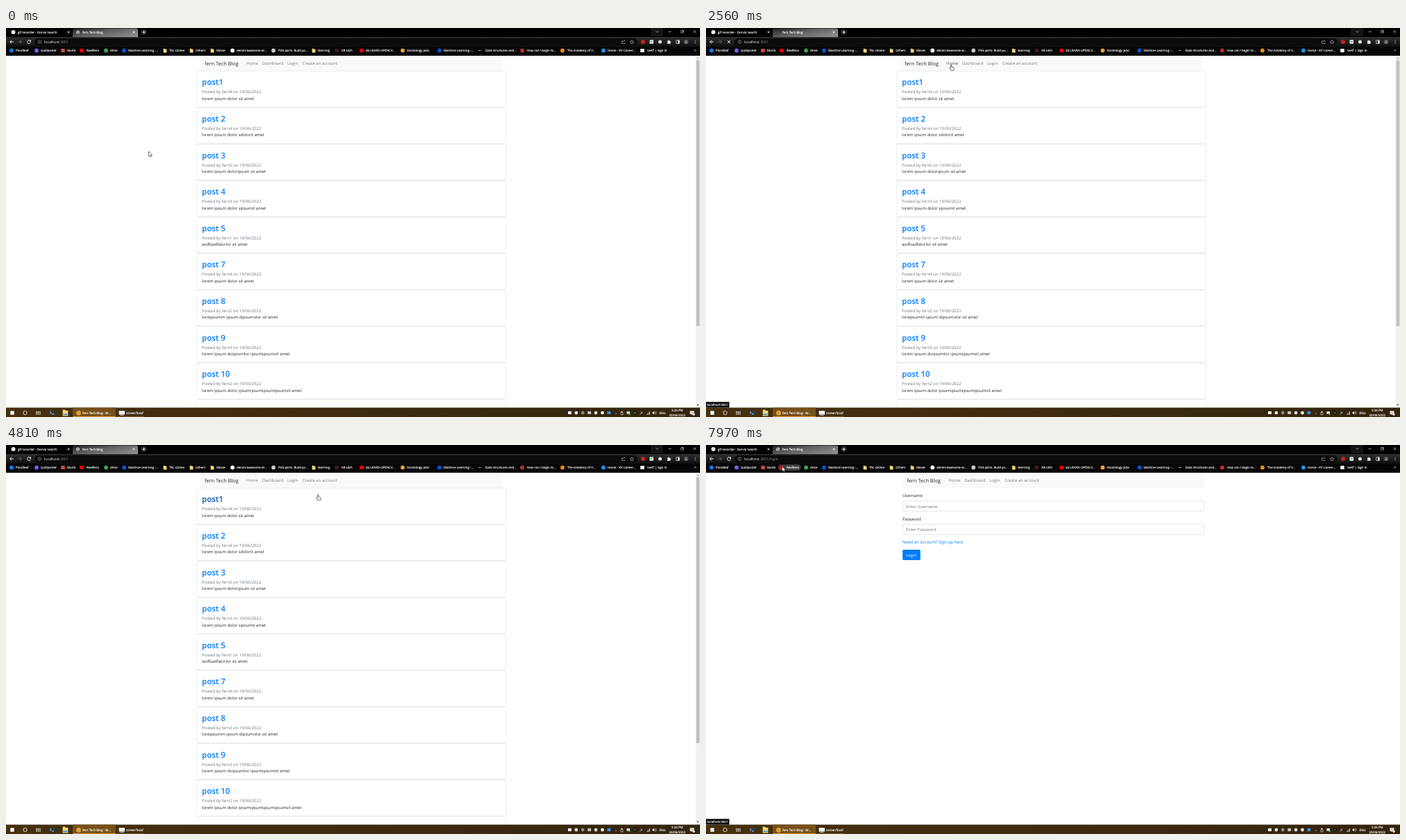
Recreate the animation shown at these times as an HTML page. Size 999 by 561 pixels, loop 8 s.

```html
<!DOCTYPE html>
<html lang="en">
<head>
<meta charset="utf-8">
<title>Blog walkthrough</title>
<style>
html, body { margin: 0; width: 100%; height: 100%; overflow: hidden; background: #fff; }
svg { display: block; width: 999px; height: 561px; font-family: "Open Sans", "Noto Sans", sans-serif; text-rendering: geometricPrecision; }
text { white-space: pre; }
.label { font-size: 4.45px; fill: #fff; stroke: #fff; stroke-width: .13px; }
</style>
</head>
<body>
<svg id="stage" viewBox="0 0 999 561" xmlns="http://www.w3.org/2000/svg"></svg>
<script>
const LOOP = 8000, MAX_SCROLL = 147, PITCH = 52.6, BODY = 5.95;
const stage = document.getElementById('stage');
const $ = id => document.getElementById(id);

// ---- drawing helpers
const text = (x, y, s, size, fill, more = '') =>
  `<text x="${x}" y="${y}" font-size="${size}" fill="${fill}" ${more}>${s}</text>`;
const label = (x, y, s, more = '') => `<text class="label" x="${x}" y="${y}" ${more}>${s}</text>`;
const rect = (x, y, w, h, fill, more = '') =>
  `<rect x="${x}" y="${y}" width="${w}" height="${h}" fill="${fill}" ${more}/>`;
const dot = (x, y, r, fill, more = '') => `<circle cx="${x}" cy="${y}" r="${r}" fill="${fill}" ${more}/>`;
const line = (d, color, w = 0.7) => `<path d="${d}" fill="none" stroke="${color}" stroke-width="${w}"/>`;
const group = (id, s) => `<g id="${id}">${s}</g>`;
const cross = (x, y, r, color, w) => line(`M${x - r} ${y - r}l${2 * r} ${2 * r}m0 ${-2 * r}l${-2 * r} ${2 * r}`, color, w);
const folder = (x, y, s = 1) =>
  `<path transform="translate(${x} ${y}) scale(${s})" d="M-2.4 -2.8h2l.6 .7h2.2v4.9h-4.8z" fill="#f7d774"/>`;

// ---- browser frame
const marks = [
  [8, 14, 'Pondleaf', '#1877f2'], [44, 50, 'Quillposter', '#7d5cf5'], [82, 88, 'Murlo', '#d9483b', 'sq'],
  [109, 116, 'Reelfenn', '#f00', 'sq'], [144, 150, 'drive', '#3fa45b'], [170, 176, 'Machine Learning -...', '#0056d2'],
  [229, 235, 'TAL Online', '', 'dir'], [267, 273, 'Others', '', 'dir'], [297, 303, 'Movie', '', 'dir'],
  [326, 332, 'dervin/awesome-al...', '#fff'], [385, 392, 'Pick parts. Build yo...', '#c9c9c9'],
  [443, 449, 'learning', '', 'dir'], [476, 483, 'Kệ sách', '#3b1d1a', 'sq'],
  [512, 518, '(8) LEARN OPENCV...', '#f00', 'sq'], [571, 577, 'Vocatology Jobs', '#e8a33d'],
  [624, 630, 'Machine Learning -...', '#0056d2'], [682, 690, 'Data Structures and...', '#aaa', 'dash'],
  [743, 750, 'How can I begin to...', '#c22d27'], [801, 808, 'The Academy of V...', '#f08a24'],
  [860, 866, 'Home - KV Career...', '#1f8fff'], [916, 923, 'SeAT | Sign In', '#f4f4f4', 'sq']
];
const markIcon = ([x, , , color, kind]) =>
  kind === 'dir' ? folder(x, 32.6) :
  kind === 'sq' ? rect(x - 2.8, 30, 5.6, 5, color) :
  kind === 'dash' ? rect(x - 2.2, 32, 4.4, 0.9, color) : dot(x, 32.5, 2.9, color);

const gray = '#c8c8c8';
const tabs =
  rect(0, 0, 999, 13, '#000') + rect(928, 0, 18, 12, '#141414') +
  `<path d="M96 13V3q0-2.500 2.500-2.500h89q2.500 0 2.500 2.500v10z" fill="url(#tab)"/>` +
  dot(10.5, 6, 3, '#efe4df') + label(17, 7.8, 'gif recorder - Dorvio Search') + cross(90, 6, 1.5, '#eee', 0.8) +
  group('favicon', dot(103.5, 6, 2.6, '#b5b5b5') + line('M101.800 4.600q1.600 .2 1.700 1.600t1.600 1.800', '#666', 0.7)) +
  label(110, 7.8, 'fern Tech Blog') + cross(184, 6, 1.5, '#fff', 0.8) +
  dot(198.5, 6, 4.6, '#222') + line('M196.200 6h4.600m-2.300-2.300v4.600', '#fff', 0.9) +
  line('M935.500 4.300l2 2 2-2', '#ccc', 0.7) + line('M953.500 5.500h4', '#eee', 0.6) +
  line('M971.500 4.300h3v3h-3zM972.500 4.300v-1h3v3h-1', '#eee', 0.5) + cross(991.5, 5.3, 1.8, '#fff', 0.6);

const toolbar =
  rect(0, 13, 999, 14, 'url(#bar)') + rect(41, 14.7, 868, 10.8, '#0b0b0b', 'rx="5.400"') +
  line('M11 20H5.700m2.400-2.400L5.700 20l2.400 2.400', '#fff', 0.9) +
  line('M17.300 20h5.200m-2.400-2.400l2.400 2.400-2.400 2.400', '#777', 0.8) +
  group('reload', line('M35.100 18.500a2.500 2.500 0 1 0 .5 2', '#fff', 0.9) + '<path d="M35.900 17v2.500h-2.500z" fill="#fff"/>') +
  group('stop', cross(33, 20, 2, '#fff', 0.9)) +
  dot(48.5, 20, 2.3, 'none', 'stroke="#bbb" stroke-width=".5"') + line('M48.500 19.700v1.500m0-2.500v.6', '#bbb', 0.6) +
  `<text x="55" y="21.900" font-size="5.190" fill="#fff">localhost<tspan id="url" fill="#8d8d8d"></tspan></text>` +
  line('M888 18.500h-1.500v4h4.500v-1.500m-3-.5q.3-2.200 2.800-2.200m-1-1.200l1.200 1.200-1.200 1.200', gray, 0.5) +
  line('M901 17.300l.8 1.900 2 .2-1.500 1.300.5 2-1.800-1.100-1.800 1.100.5-2-1.500-1.300 2-.2z', gray, 0.55) +
  dot(917, 20, 3.1, '#c9201f') + rect(926.5, 17.2, 5.5, 5.5, '#e8e8e8', 'rx=".6"') + rect(927.5, 19.4, 3.5, 0.8, '#555') +
  dot(941.5, 20, 2.5, '#eadfdd') +
  `<path d="M951.800 18.400h1.500a.8 .8 0 1 1 1.600 0h1.500v1.300a.8 .8 0 1 1 0 1.600v1.500h-4.600v-1.400a.8 .8 0 1 0 0-1.600z" fill="#eee"/>` +
  line('M964.700 17.800h4.600v4.600h-4.600z', '#eee', 0.7) + rect(967.3, 17.8, 2, 4.6, '#eee') +
  dot(979, 20, 3.3, '#4d5054') + dot(979, 19, 1.1, '#8c9094') + rect(977.3, 20.6, 3.4, 1.3, '#8c9094', 'rx=".6"') +
  [-2, 0, 2].map(d => dot(992, 20 + d, 0.55, '#eee')).join('');

const bookmarks =
  rect(0, 27, 999, 13, '#060606') + rect(0, 28, 0, 9, '#3d3d3d', 'id="pill" rx="4.500"') +
  marks.map(m => markIcon(m) + label(m[1], 34.2, m[2], 'data-mark=""')).join('') +
  line('M990.300 31l1.200 1.300-1.200 1.300m1.700-2.600l1.200 1.300-1.200 1.300', '#fff', 0.5);

// ---- page content
const posts = [
  ['1', 4, 'lorem ipsum dolor sit amet'], [' 2', 4, 'lorem ipsum dolor sdolorit amet'],
  [' 3', 5, 'lorem ipsum doloripsum sit amet'], [' 4', 3, 'lorem ipsum dolor sipsumit amet'],
  [' 5', 1, 'asdfsadfalorlor sit amet'], [' 7', 4, 'lorem ipsum dolor sit amet'],
  [' 8', 2, 'loreipsumm ipsum dipsumolor sit amet'], [' 9', 3, 'lorem ipsum doipsumlor ipsumipsumsit amet'],
  [' 10', 2, 'lorem ipsum dolor ipsumipsumipsumipsumsit amet'], [' 11', 1, 'lorem ipsum dolor sit amet'],
  [' 12', 5, 'lorem ipsum dolor sit amet'], [' 13', 3, 'lorem ipsum dolor sit amet']
];
const card = ([n, user, body], i) => {
  const y = 62 + i * PITCH;
  return rect(274.7, y + 0.2, 444.8, PITCH - 0.4, '#fff', 'stroke="#dcdcdc" stroke-width=".5" rx="1.600"') +
    line(`M275.500 ${y + PITCH}h443`, '#d3d3d3', 0.7) +
    text(282, y + 20.4, 'post' + n, 11.5, '#007bff', 'class="title" font-weight="600"') +
    text(282, y + 32.3, `Posted by fern${user} on 19/06/2022`, BODY, '#6c757d') +
    text(282, y + 41.7, body, BODY, '#212529');
};
const links = [[346, 16.5, 'Home'], [368.7, 30, 'Dashboard'], [405, 15.5, 'Login'], [426.7, 50.5, 'Create an account']];
const nav =
  rect(280, 40, 434, 22, '#f8f9fa') + text(286, 53.8, 'fern Tech Blog', 7.35, '#2c2c2c') +
  links.map(([x, , s]) => text(x, 53.3, s, BODY, '#000', 'class="link"')).join('');
const field = (y, name, hint) =>
  text(283, y, name, BODY, '#212529') +
  rect(283.2, y + 5.5, 433.7, 14.7, '#fff', 'rx="1.600" stroke="#ced4da" stroke-width=".6"') +
  text(288, y + 15.6, hint, BODY, '#6c757d');
const button = (y, w, s) => rect(282.9, y, w, 15, '#007bff', 'rx="1.600"') + text(288, y + 9.8, s, BODY, '#fff');

const page = `<g clip-path="url(#view)">` + rect(0, 40, 999, 508, '#fff') +
  group('scroller', group('nav', nav) + group('cards', posts.map(card).join(''))) +
  group('form', field(75.1, 'Username', 'Enter Username') + field(108.8, 'Password', 'Enter Password') +
    group('signup', field(142.4, 'Confirm Password', 'Enter Password Again to Confirm') + button(168.9, 32.2, 'Sign Up')) +
    group('login', text(283, 142.3, 'Need an account? Sign up here', 6.05, '#007bff') + button(150.9, 25.7, 'Login'))) +
  group('scrollbar', rect(992.7, 40, 6.3, 508, '#f1f1f1') + rect(993.6, 46.5, 4.7, 383.5, '#c1c1c1', 'id="thumb"') +
    '<path id="up" d="M994 44.500l1.900-2 1.900 2z"/><path id="down" d="M994 542.800l1.900 2 1.900-2z"/>') + '</g>';

// ---- taskbar
const trayColors = ['#fff', '#e6e6e6', '#8f8b84', '#c5c1ba', '#d8d8d8', '#eee', '#3d8be0'];
const trayIcon = (c, i) => {
  const x = 811.5 + i * 9.4;
  return i % 3 ? dot(x, 555, 2.4, c) : rect(x - 2.5, 552.8, 5, 4.2, c, 'rx=".8"');
};
const taskbar =
  rect(0, 547.5, 999, 13.5, 'url(#task)') + rect(96, 547.5, 62, 13.5, '#76501a') + rect(96, 560, 62, 1, '#d79a3c') +
  rect(159, 560.2, 40, 0.8, '#8a6428') +
  rect(6.3, 552.3, 5.4, 5.4, '#fff') + dot(27.5, 555, 2.7, 'none', 'stroke="#fff" stroke-width=".8"') +
  line('M43.500 552.500v1h4.500v-1m-4.500 5.500v-1h4.500v1M43.500 554.300h4.500v1.600h-4.500zM49.400 552.500v5.500', '#fff', 0.55) +
  rect(62, 551.8, 8.5, 6.6, '#2b3d4c') + line('M63.300 553.200l1.800 1.500-1.800 1.500m2.700 .6h3', '#fff', 0.7) +
  folder(85.5, 555, 1.6) + rect(82.3, 556.3, 6.4, 2, '#3f9be0') + dot(104.5, 555.2, 3.5, '#d9a02e') +
  label(110, 556.7, 'fern Tech Blog - Br...') +
  rect(162.5, 552, 8.5, 5.5, '#eee', 'rx=".5"') + rect(164, 558, 5.5, 0.8, '#ccc') + label(173, 556.7, 'ScreenToGif') +
  trayColors.map(trayIcon).join('') +
  dot(878, 556, 0.8, '#aaa') + line('M885 557.800v-3.300h3v3.300zm.7-3.300v-1.700h1.600v1.700', '#eee', 0.6) +
  rect(893.5, 553, 4.5, 3.5, '#eee') + dot(897.5, 557, 1.3, '#3cae58') +
  dot(905.5, 555, 2.5, '#111') + line('M904 555h2.800', '#fff', 0.6) +
  line('M912.500 557.500l3.500-4m-2.600 .2l2.800 2.300', '#ddd', 0.7) + line('M922.500 557.800v-1m1.300 1v-2.200m1.300 2.200v-3.500m1.300 3.500v-5', '#ddd', 0.8) +
  '<path d="M930.500 554h1.200l1.500-1.500v5l-1.500-1.500h-1.200z" fill="#fff"/>' + line('M934.300 553.500q1 1.500 0 3m1.200-4q1.600 2.500 0 5', '#eee', 0.5) +
  label(940.5, 556.7, 'ENG') +
  label(966.3, 553.4, '3:26 PM', 'text-anchor="middle"') + label(966.3, 560, '20/06/2022', 'text-anchor="middle"') +
  '<path d="M984.500 552.200h6v4.600h-2.500l-1.500 1.500v-1.500h-2z" fill="#fff"/>' + line('M985.500 553.700h4m-4 1.500h4', '#4a3510', 0.4) + dot(990, 557.2, 1.7, '#ddd');

const gradient = (id, dir, ...stops) => `<linearGradient id="${id}" ${dir}>` +
  stops.map((c, i) => `<stop offset="${i / (stops.length - 1)}" stop-color="${c}"/>`).join('') + '</linearGradient>';
stage.innerHTML = '<defs>' + gradient('tab', 'x2="1" y2=".7"', '#1e1e1e', '#606060', '#8a8a8a') +
  gradient('bar', 'x2="0" y2="1"', '#303030', '#0e0e0e') + gradient('task', '', '#45300f', '#3d2a10', '#33240f') +
  `<clipPath id="view">${rect(0, 40, 999, 507.5, '#000')}</clipPath></defs>` +
  page + tabs + toolbar + bookmarks +
  group('status', rect(-1, 539.2, 10, 8.3, '#0a0a0a', 'id="bubble" stroke="#555" stroke-width=".3"') + label(1.5, 545.2, '', 'id="hint"')) +
  taskbar +
  group('cursor',
    '<path id="arrow" d="M0 0V7.200l1.700-1.500 1.100 2.500 1.100-.5-1.100-2.400h2.300z" fill="#fff" stroke="#000" stroke-width=".5"/>' +
    '<path id="hand" d="M-.7 .7a.7 .7 0 0 1 1.400 0V3l2.700 .6q.9 .3 .8 1.300l-.5 2.100v1.200h-4.200v-1L-2.400 5q-.2-1 .6-.9l1.100 .9z" fill="#fff" stroke="#000" stroke-width=".55"/>');

// ---- timeline
const path = [
  [30, 205.5, 178], [450, 290, 215], [820, 330, 230], [1000, 320, 190], [1270, 300, 80], [1340, 298, 82], [1480, 295.5, 111],
  [1640, 305, 106], [1850, 386, 80], [2120, 353, 53], [2560, 353, 53], [2850, 441, 78], [3180, 322, 84], [3440, 318, 53],
  [4080, 318, 53], [4450, 268, 82], [4670, 251.5, 90], [4810, 449, 71.5], [5100, 470, 51], [5260, 470, 51], [5800, 472, 52],
  [6450, 472, 52], [6790, 446, 58], [6990, 410, 40], [7120, 409, 34], [7400, 415, 51], [7700, 415, 51], [7890, 302, 51], [7970, 109.5, 31]
];
const scroll = [[100, 0], [720, MAX_SCROLL], [920, MAX_SCROLL], [1230, 0]];
const hints = [
  [0, null], [1290, '/post/1'], [2060, ''], [2930, '/post/1'], [3400, ''], [4180, null],
  [5260, '/signup'], [6560, null], [7420, '/login'], [7800, null], [7890, '']
];
const loads = [[2390, 2700], [3880, 4180], [5990, 6560], [7660, 7790]];

const at = (keys, t) => {
  const i = keys.findIndex(k => k[0] > t);
  if (i < 0) return keys[keys.length - 1].slice(1);
  if (!i) return keys[0].slice(1);
  const [a, b] = [keys[i - 1], keys[i]];
  const u = (t - a[0]) / (b[0] - a[0]), e = u * u * (3 - 2 * u);
  return a.slice(1).map((v, j) => v + (b[j + 1] - v) * e);
};
const step = (keys, t) => keys.filter(k => k[0] <= t).pop()[1];
const show = (id, on) => $(id).setAttribute('visibility', on ? 'inherit' : 'hidden');
const within = (x, y, l, t, w, h) => x >= l && x <= l + w && y >= t && y <= t + h;

const titles = [...stage.querySelectorAll('.title')];
const linkNodes = [...stage.querySelectorAll('.link')];
const markNodes = [...stage.querySelectorAll('[data-mark]')];

function render(t) {
  const [x, y] = at(path, t), [offset] = at(scroll, t);
  const route = t < 6560 ? '' : t < 7790 ? '/signup' : '/login';
  const home = !route, shift = home ? 0 : 3.2;
  const loading = loads.some(([a, b]) => t >= a && t < b);

  show('cards', home); show('scrollbar', home);
  show('form', !home); show('signup', route === '/signup'); show('login', route === '/login');
  $('scroller').setAttribute('transform', `translate(0 ${-offset})`);
  $('nav').setAttribute('transform', `translate(${shift} 0)`);
  $('thumb').setAttribute('y', 46.5 + offset / MAX_SCROLL * 111);
  $('up').setAttribute('fill', offset > 0.5 ? '#505050' : '#a3a3a3');
  $('down').setAttribute('fill', offset < MAX_SCROLL - 0.5 ? '#505050' : '#a3a3a3');

  const px = x - shift, py = y + offset;
  let hot = y > 40 && within(px, py, 286, 46, 50, 11);
  titles.forEach((n, i) => {
    const on = home && within(x, py, 282, 71 + i * PITCH, 430, 15);
    n.setAttribute('fill', on ? '#0056b3' : '#007bff');
    hot = hot || on;
  });
  linkNodes.forEach((n, i) => {
    const on = y > 40 && within(px, py, links[i][0], 45, links[i][1], 13);
    n.setAttribute('fill-opacity', on ? 0.7 : 0.5);
    hot = hot || on;
  });

  let pill = 0;
  markNodes.forEach((n, i) => {
    const left = marks[i][0] - 5, w = marks[i][1] - left + n.getComputedTextLength() + 2.5;
    if (within(x, y, left, 28, w, 9)) { $('pill').setAttribute('x', left); pill = w; }
  });
  $('pill').setAttribute('width', pill);

  show('favicon', !loading); show('reload', !loading); show('stop', loading);
  $('url').textContent = ':3001' + route;

  const hint = step(hints, t);
  show('status', hint !== null);
  if (hint !== null) {
    $('hint').textContent = 'localhost:3001' + hint;
    $('bubble').setAttribute('width', $('hint').getComputedTextLength() + 4.5);
  }

  show('arrow', !hot); show('hand', hot);
  $('cursor').setAttribute('transform', `translate(${x} ${y})`);
}

function tick() {
  render(performance.now() % LOOP);
  requestAnimationFrame(tick);
}
tick();
</script>
</body>
</html>
```
